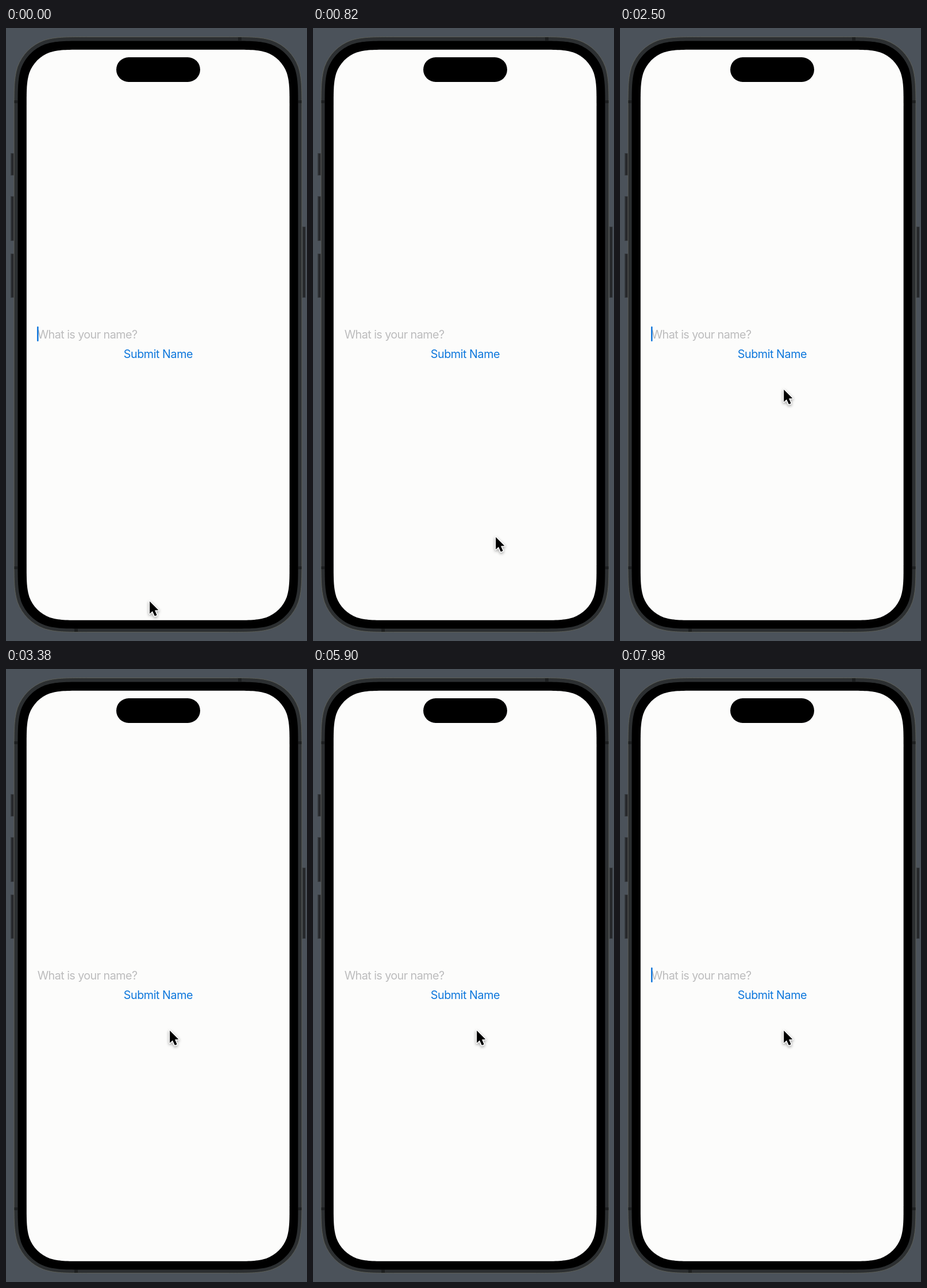
An HTML page with a canvas that plays this animation: 524 by 1068 pixels, repeating every 8 s.

```html
<!DOCTYPE html>
<html lang="en">
<head>
<meta charset="utf-8">
<title>Name form</title>
<style>
  html, body { margin: 0; width: 100%; height: 100%; overflow: hidden; background: #4b525a; }
  canvas { display: block; width: 524px; height: 1068px; }
</style>
</head>
<body>
<canvas id="stage" width="524" height="1068"></canvas>
<script>
const ctx = document.getElementById('stage').getContext('2d');
const LOOP = 8000;

// Cursor keys: step, x, y, and velocity per step.
const path = [
  [0, 250.2, 999, 5, -4.5],
  [17, 318.2, 887, 2.2, -10.5],
  [34, 315.2, 694, -2.2, -6.5],
  [50, 285.2, 630, 0, 0]
];

const arrow = [[0, 0], [0, 21.5], [4.8, 17], [8.7, 25.5], [12.5, 24], [8.8, 15.5], [15.2, 15.2]];

// Rounded rectangle with continuous-curvature corners.
function squircle(x0, y0, x1, y1, r) {
  const p = new Path2D();
  const corners = [[x1, y0, 0], [x1, y1, 1], [x0, y1, 2], [x0, y0, 3]];
  corners.forEach(([cx, cy, turn], i) => {
    const c = [1, 0, -1, 0][turn], s = [0, 1, 0, -1][turn];
    // a: distance back along the incoming side, b: distance along the outgoing one
    const at = (a, b) => [cx + r * (-a * c - b * s), cy + r * (-a * s + b * c)];
    const start = at(1.5287, 0);
    if (i) p.lineTo(...start); else p.moveTo(...start);
    p.bezierCurveTo(...at(1.0885, 0), ...at(0.8684, 0), ...at(0.6315, 0.0749));
    p.bezierCurveTo(...at(0.3728, 0.1691), ...at(0.1691, 0.3728), ...at(0.0749, 0.6315));
    p.bezierCurveTo(...at(0, 0.8684), ...at(0, 1.0885), ...at(0, 1.5287));
  });
  p.closePath();
  return p;
}

const shell = squircle(14, 15.5, 515, 1052.5, 82);
const bezel = squircle(20.5, 22.5, 508.5, 1046.5, 76);
const screen = squircle(35.8, 37.8, 493.6, 1031.7, 64);

function rect(color, x, y, w, h) {
  ctx.fillStyle = color;
  ctx.fillRect(x, y, w, h);
}

function fill(color, shape) {
  ctx.fillStyle = color;
  ctx.fill(shape);
}

function sideButton(x, y, h) {
  rect('#363a3e', x, y, 6, h);
  rect('#26282b', x + 1.5, y + 1, 4, h - 2);
}

function drawPhone() {
  rect('#4b525a', 0, 0, 524, 1068);
  sideButton(8, 218, 39);
  sideButton(8, 293, 78);
  sideButton(8, 393, 77);
  sideButton(515.5, 346, 124);

  fill('#2c2f31', shell);
  ctx.strokeStyle = '#5d5f58';
  ctx.lineWidth = 1;
  ctx.stroke(shell);
  for (const y of [126, 938]) {
    rect('#1d1f20', 14.5, y, 6, 5);
    rect('#1d1f20', 508.5, y, 6, 5);
  }
  rect('#1d1f20', 404, 16, 6, 6);
  rect('#1d1f20', 119, 1046.5, 6, 5.5);

  fill('#000', bezel);
  fill('#fcfcfb', screen);
  ctx.fillStyle = '#000';
  ctx.beginPath();
  ctx.roundRect(192, 51, 146, 43, 21.5);
  ctx.fill();
}

function label(text, color, x, y, spacing) {
  ctx.font = '19.8px Inter, Roboto, sans-serif';
  ctx.letterSpacing = spacing + 'px';
  ctx.fillStyle = color;
  ctx.fillText(text, x, y);
}

// Playback has an uneven beat: three steps of 20, 100 and 20 ms.
function stepAt(ms) {
  const r = ms % 140;
  return 3 * Math.floor(ms / 140) + (r < 20 ? 0 : r < 120 ? 1 : 2);
}

// One blink per 60 steps: fade out, pause, fade in, hold.
function caretAlpha(step) {
  const p = step % 60;
  if (p < 7) return 1 - p / 7;
  if (p < 19) return 0;
  return Math.min(1, (p - 19) / 9);
}

function hermite(a, b, va, vb, u, d) {
  const u2 = u * u, u3 = u2 * u;
  return a * (2 * u3 - 3 * u2 + 1) + b * (3 * u2 - 2 * u3)
    + d * (va * (u3 - 2 * u2 + u) + vb * (u3 - u2));
}

function cursorAt(step) {
  const i = path.findIndex(k => k[0] > step);
  if (i < 0) return path[path.length - 1].slice(1, 3);
  const a = path[i - 1], b = path[i];
  const d = b[0] - a[0], u = (step - a[0]) / d;
  return [1, 2].map(n => hermite(a[n], b[n], a[n + 2], b[n + 2], u, d));
}

function drawCursor(x, y) {
  ctx.save();
  ctx.translate(x, y);
  ctx.beginPath();
  arrow.forEach(p => ctx.lineTo(...p));
  ctx.closePath();
  ctx.lineJoin = 'round';
  ctx.strokeStyle = '#fff';
  ctx.lineWidth = 3;
  ctx.shadowColor = 'rgba(0,0,0,0.4)';
  ctx.shadowBlur = 5;
  ctx.shadowOffsetY = 2;
  ctx.stroke();
  ctx.shadowColor = 'transparent';
  ctx.fillStyle = '#000';
  ctx.fill();
  ctx.restore();
}

function draw(ms) {
  const step = stepAt(ms);
  drawPhone();
  label('What is your name?', '#bcbcbd', 54.7, 540.5, -0.58);
  label('Submit Name', '#0d77dc', 204.8, 574.5, -0.48);
  ctx.globalAlpha = caretAlpha(step);
  ctx.fillStyle = '#1478dc';
  ctx.beginPath();
  ctx.roundRect(54, 520, 2.6, 26, 1.2);
  ctx.fill();
  ctx.globalAlpha = 1;
  drawCursor(...cursorAt(step));
}

const begin = performance.now();
function tick() {
  draw((performance.now() - begin) % LOOP);
  requestAnimationFrame(tick);
}
tick();
</script>
</body>
</html>
```
